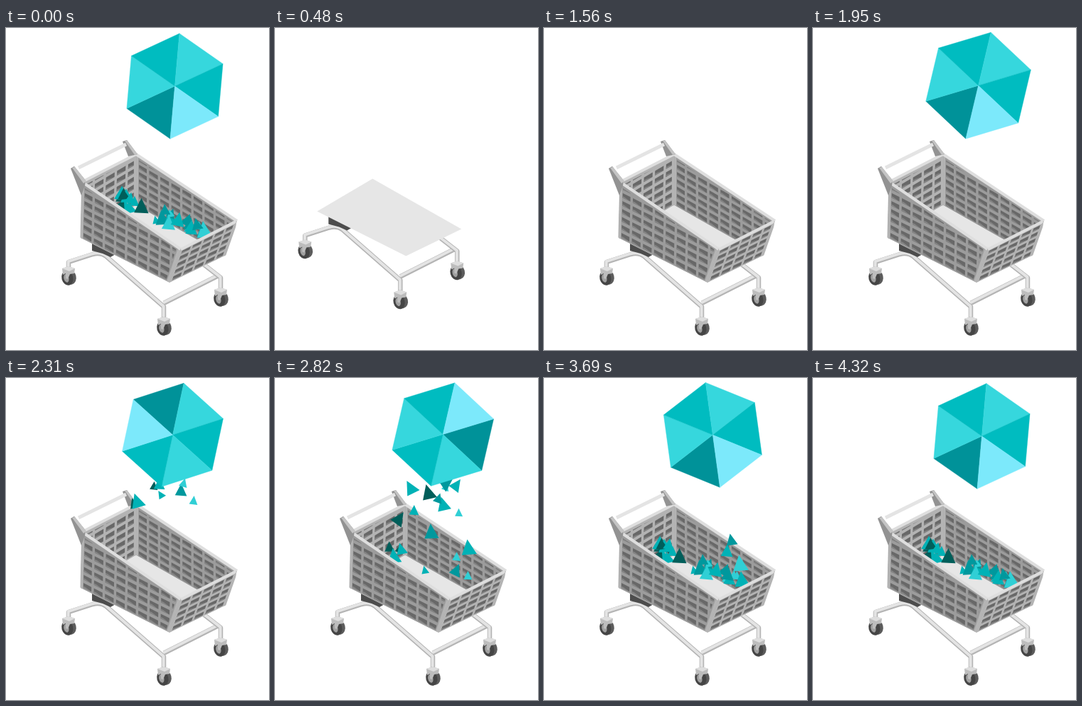
These frames come from a looping animation (370x454 px, 4820 ms). An HTML page:

```html
<!DOCTYPE html>
<html lang="en">
<head>
<meta charset="utf-8">
<title>Shopping cart</title>
<style>
  html, body { margin: 0; width: 100%; height: 100%; overflow: hidden; background: #fff; }
  svg { display: block; width: 100vw; height: 100vh; }
</style>
</head>
<body>
<svg id="stage" viewBox="0 0 370 454"></svg>
<script>
const LOOP = 4820, SETTLED = 4320;
const stage = document.getElementById('stage');

function add(parent, tag, attrs = {}) {
  const node = document.createElementNS('http://www.w3.org/2000/svg', tag);
  for (const key in attrs) node.setAttribute(key, attrs[key]);
  parent.appendChild(node);
  return node;
}
const group = (parent, attrs) => add(parent, 'g', attrs);
const poly = (parent, points, fill) => add(parent, 'polygon', { points: points.join(' '), fill });
const line = (parent, d, stroke, width) => add(parent, 'path', {
  d, stroke, 'stroke-width': width, fill: 'none', 'stroke-linejoin': 'round'
});
const oval = (parent, cx, cy, rx, ry, fill) =>
  add(parent, 'ellipse', { cx, cy, rx, ry, fill, transform: 'rotate(-15)' });
const move = (node, x, y) => node.setAttribute('transform', `translate(${x} ${y})`);
const show = (node, on) => node.setAttribute('display', on ? 'inline' : 'none');

const clamp = v => Math.min(1, Math.max(0, v));
const mix = (a, b, p) => a + (b - a) * p;
const mixPoint = (a, b, p) => [mix(a[0], b[0], p), mix(a[1], b[1], p)];
const progress = (t, from, to) => clamp((t - from) / (to - from));
const easeInOut = p => (1 - Math.cos(Math.PI * p)) / 2;
const easeOut = p => 1 - (1 - p) ** 3;
const easeOutBack = p => 1 + 2.2 * (p - 1) ** 3 + 1.2 * (p - 1) ** 2;

function seededRandom(seed) {
  return (low, high) => {
    seed = (seed * 16807) % 2147483647;
    return mix(low, high, seed / 2147483647);
  };
}

function clipTo(parent, id, points) {
  poly(add(parent, 'clipPath', { id }), points);
  return group(parent, { 'clip-path': `url(#${id})` });
}

// A perforated wall that slides up out of its own bottom edge.
// The slots follow the bottom edge and are cut off by the wall's outline.
function makePanel(parent, id, [tl, tr, br, bl], face) {
  const [a, b] = [mixPoint(bl, br, -0.2), mixPoint(bl, br, 1.2)];
  const window = clipTo(parent, id, [a, b, [b[0], -100], [a[0], -100]]);
  const body = group(window);
  poly(body, [tl, tr, br, bl], face);

  const inset = (u, v) => mixPoint(mixPoint(tl, tr, u), mixPoint(bl, br, u), v);
  const holes = clipTo(body, id + '-holes',
    [inset(0.03, 0.08), inset(0.96, 0.08), inset(0.96, 0.98), inset(0.03, 0.98)]);
  const across = [br[0] - bl[0], br[1] - bl[1]], up = [tl[0] - bl[0], tl[1] - bl[1]];
  const cols = Math.round(across[0] / 15), rows = Math.round(Math.hypot(...up) / 11);
  const at = (c, r) => [0, 1].map(k => bl[k] + across[k] * c / cols + up[k] * r / rows);
  for (let c = 0; c < cols + 2; c++) {
    for (let r = 0; r < rows; r++) {
      const [l, m, h] = [c + 0.18, c + 0.4, c + 0.96];
      const [low, high] = [r + 0.2, r + 0.78];
      poly(holes, [at(l, low), at(h, low), at(h, high), at(l, high)], '#686868');
      poly(holes, [at(l, low), at(h, low), at(m, low + 0.2), at(l, low + 0.2)], '#858585');
    }
  }
  line(body, `M${inset(0.012, 0)}L${inset(0.012, 1)}`, '#b4b4b4', 3);
  line(body, `M${inset(0.985, 0)}L${inset(0.985, 1)}`, '#b4b4b4', 4);
  line(body, `M${tl}L${tr}`, '#dedede', 4);
  return body;
}

function makeWheel(parent, x, y) {
  const wheel = group(parent);
  move(wheel, x, y);
  oval(wheel, 2, 1, 8.5, 10.5, '#5c5c5c');
  oval(wheel, -2, 1, 8, 10.5, '#454545');
  oval(wheel, -3.5, 1, 3.5, 6, '#a0a0a0');
  poly(wheel, [[-9, -12], [0, -15], [9, -12], [8, -5], [2, -4], [-1, 3], [-4, 2], [-4, -5], [-8, -3]], '#bdbdbd');
  poly(wheel, [[-9, -12], [0, -15], [9, -12], [1, -8]], '#dedede');
}

function makeRail(parent, d) {
  line(parent, d, '#b4b4b4', 6.5);
  move(line(parent, d, '#e4e4e4', 4), -0.4, -0.8);
}

// Cart, back to front
const cart = group(stage);
makeRail(cart, 'M222 388L299 349');
makeRail(cart, 'M270 327L302 352V368');
makeRail(cart, 'M88 339V330L122 319Q133 316 141 322L222 393V408');
poly(cart, [[121, 303], [154, 319], [147, 323], [136, 318], [121, 314]], '#4d4d4d');
for (const [x, y] of [[88, 351], [302, 381], [222, 422]]) makeWheel(cart, x, y);

const left = [107, 217], back = [183, 178], right = [325, 272], front = [246, 312];
const lowLeft = [105, 296], lowBack = [183, 250], lowRight = [308, 321], lowFront = [230, 359];
poly(cart, [lowLeft, lowBack, lowRight, lowFront], '#e6e6e6');

const backEnd = makePanel(cart, 'back-end', [left, back, lowBack, lowLeft], '#b3b3b3');
const backSide = makePanel(cart, 'back-side', [back, right, lowRight, lowBack], '#9c9c9c');

const farHandle = group(cart);
poly(farHandle, [[164, 160], [170, 158], [185, 178], [172, 181]], '#929292');
poly(farHandle, [[167, 159], [170, 158], [185, 178], [181, 179]], '#c4c4c4');
line(farHandle, 'M102 197L169 164', '#e4e4e4', 5);

const shardLayer = group(cart);

const frontSide = makePanel(cart, 'front-side', [left, front, lowFront, lowLeft], '#9c9c9c');
const frontEnd = makePanel(cart, 'front-end', [front, right, lowRight, lowFront], '#b3b3b3');

const nearHandle = group(cart);
poly(nearHandle, [[91, 198], [96, 195], [112, 215], [111, 222], [106, 236]], '#929292');
poly(nearHandle, [[93, 197], [97, 196], [113, 216], [109, 219]], '#c4c4c4');

// Shards fall one after another into a left and a right pile.
const SHARDS = 30, FALL = 620;
const shardColors = ['#005e5a', '#00b2b6', '#30cfd5', '#00b2b6', '#00989d'];
const random = seededRandom(2024);
const shards = Array.from({ length: SHARDS }, (_, i) => {
  const x1 = i % 5 < 2 ? random(160, 190) : random(208, 280);
  return {
    x1,
    x0: mix(x1, 235, 0.6) + random(-10, 10),
    y1: 243 + 0.39 * (x1 - 160) + random(-11, 9),
    start: 1990 + 1230 * i / (SHARDS - 1),
    size: random(6, 12.5),
    tilt: random(-20, 20),
    spin: random(-50, 50),
    node: poly(shardLayer, [[0.15, -1.1], [0.9, 0.8], [-0.85, 0.6]], shardColors[i % 5])
  };
});

// Hexagon
const gem = group(stage);
const onCircle = deg => {
  const a = deg * Math.PI / 180;
  return [74.6 * Math.sin(a), -74.6 * Math.cos(a)];
};
['#009299', '#36d7dd', '#00bcc0', '#36d7dd', '#00bcc0', '#7ce9fb'].forEach((fill, i) => {
  const face = poly(gem, [[0, 0], onCircle(i * 60), onCircle(i * 60 + 60)], fill);
  face.setAttribute('stroke', fill);
  face.setAttribute('stroke-width', 0.4);
});

function slidePanel(node, t, from, to, depth) {
  show(node, t >= from);
  move(node, 0, depth * (1 - easeInOut(progress(t, from, to))));
}

function drawShard(s, t) {
  const p = progress(t, s.start, s.start + FALL);
  show(s.node, t >= s.start);
  const x = mix(s.x0, s.x1, p), y = mix(148, s.y1, p ** 1.7);
  const angle = s.tilt + s.spin * (1 - p);
  s.node.setAttribute('transform', `translate(${x} ${y}) rotate(${angle}) scale(${s.size})`);
}

function drawGem(t) {
  const p = progress(t, 1650, SETTLED);
  const x = 237.5 - 7 * (1 - p) ** 3, y = 82 - 2.5 * Math.sin(Math.PI * p);
  const angle = 185 - 46 * ((SETTLED - Math.min(t, SETTLED)) / 1050) ** 2.5;
  const scale = Math.max(0, easeOutBack(progress(t, 1620, 2040)));
  show(gem, t > 1630);
  gem.setAttribute('transform', `translate(${x} ${y}) rotate(${angle}) scale(${scale})`);
}

function render(time) {
  const t = time < 30 ? SETTLED : Math.min(time, SETTLED);

  const away = -70 * (1 - easeInOut(progress(t, 0, 1200)));
  move(cart, away, away * 0.82);
  slidePanel(backSide, t, 520, 1080, 74);
  slidePanel(frontSide, t, 660, 1170, 82);
  slidePanel(backEnd, t, 930, 1320, 84);
  slidePanel(frontEnd, t, 1020, 1440, 60);

  const drop = -143 * (1 - easeOut(progress(t, 1110, 1530)));
  for (const handle of [farHandle, nearHandle]) {
    show(handle, t >= 1110);
    move(handle, 0, drop);
  }

  for (const shard of shards) drawShard(shard, t);
  drawGem(t);
}

const began = performance.now();
function tick() {
  render((performance.now() - began) % LOOP);
  requestAnimationFrame(tick);
}
tick();
</script>
</body>
</html>
```
